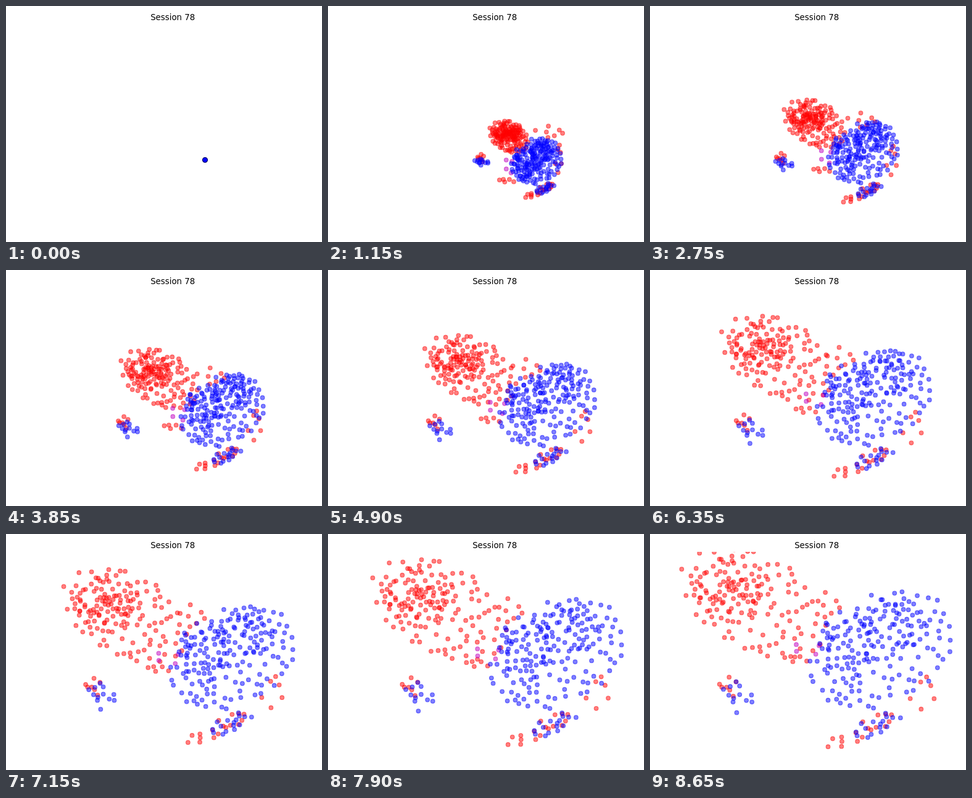
Write an HTML page with a canvas that moves like this. It is 512 px wide and 384 px high and loops after 8700 ms.

```html
<!DOCTYPE html>
<html lang="en">
<head>
<meta charset="utf-8">
<title>Session 78</title>
<style>
  html, body { margin: 0; width: 512px; height: 384px; overflow: hidden; background: #fff; }
  canvas, svg { position: absolute; left: 0; top: 0; width: 512px; height: 384px; display: block; }
  text { font: 13.333px "DejaVu Sans", sans-serif; text-anchor: middle; }
</style>
</head>
<body>
<canvas id="plot" width="512" height="384"></canvas>
<svg viewBox="0 0 512 384"><text x="270.2" y="22.5">Session 78</text></svg>
<script>
const LOOP = 8700, STEP = 50, HOLD = 150;
const SETTLE = 1150, END = 8650;
const ORIGIN = { x: 322.5, y: 250.5 };
const RED = '#f00', BLUE = '#00f', PLUM = '#bf00bf';
const ctx = document.getElementById('plot').getContext('2d');

let seed = 78;
const rand = () => (seed = (seed * 16807) % 2147483647) / 2147483647;
const mix = (a, b, k) => a + (b - a) * k;

// Random points in the unit disc that keep some distance; power .5 is even, 1 crowds the middle
function disc(count, power) {
  const pts = [];
  while (pts.length < count) {
    let best, bestGap = -1;
    for (let i = 0; i < 4; i++) {
      const a = rand() * Math.PI * 2, r = rand() ** power;
      const x = r * Math.cos(a), y = r * Math.sin(a);
      const gap = Math.min(9, ...pts.map(p => Math.hypot(p.x - x, p.y - y)));
      if (gap > bestGap) [best, bestGap] = [{ x, y }, gap];
    }
    pts.push(best);
  }
  return pts;
}

// An ellipse [cx, cy, rx, ry] of points that drifts and swells steadily; bend makes the drift start faster
function blob(color, count, from, to, { tilt = 0, power = .5, bend = 0 } = {}) {
  const pts = disc(count, power);
  const cos = Math.cos(tilt * Math.PI / 180), sin = Math.sin(tilt * Math.PI / 180);
  return {
    color,
    at(k) {
      const drift = k + bend * k * (1 - k);
      const cx = mix(from[0], to[0], drift), cy = mix(from[1], to[1], drift);
      const rx = mix(from[2], to[2], k), ry = mix(from[3], to[3], k);
      return pts.map(p => ({
        x: cx + p.x * rx * cos - p.y * ry * sin,
        y: cy + p.x * rx * sin + p.y * ry * cos
      }));
    }
  };
}

const blobs = [
  // red cloud: body, dense core, stragglers
  blob(RED, 92, [293, 212, 34, 24], [168, 110, 130, 78], { tilt: 28 }),
  blob(RED, 65, [291, 208, 20, 14], [132, 92, 62, 54], { power: .8 }),
  blob(RED, 7, [355, 207, 26, 12], [282, 120, 26, 26]),
  blob(RED, 5, [290, 284, 13, 4], [237, 203, 20, 8]),
  blob(RED, 6, [374, 248, 6, 24], [444, 258, 24, 28], { bend: .3 }),
  // small island and lower tail
  blob(RED, 7, [248, 248, 6, 7], [128, 250, 17, 18], { bend: .5 }),
  blob(RED, 17, [341, 301, 26, 6], [338, 321, 62, 16], { tilt: -25 }),
  blob(PLUM, 4, [293, 260, 9, 24], [254, 187, 36, 18]),
  // blue cloud: body and two dense cores
  blob(BLUE, 108, [338, 252, 43, 36], [375, 188, 125, 88], { tilt: -28 }),
  blob(BLUE, 38, [347, 235, 20, 18], [398, 145, 58, 45], { power: .8, bend: .4 }),
  blob(BLUE, 46, [321, 257, 22, 22], [318, 185, 46, 62], { power: .8, bend: .3 }),
  blob(BLUE, 12, [248, 254, 12, 5], [141, 265, 26, 26], { bend: .5 }),
  blob(BLUE, 16, [350, 297, 20, 6], [364, 312, 52, 14], { tilt: -25 })
];

function dot(x, y, r, fill, edge) {
  ctx.beginPath();
  ctx.arc(x, y, r, 0, Math.PI * 2);
  ctx.fillStyle = fill;
  ctx.strokeStyle = edge;
  ctx.fill();
  ctx.stroke();
}

function draw(now) {
  const t = Math.floor((now % LOOP) / STEP) * STEP;
  ctx.clearRect(0, 0, 512, 384);
  ctx.lineWidth = 1.11;
  if (t < HOLD) {
    dot(ORIGIN.x, ORIGIN.y, 4, BLUE, '#000050');
    return;
  }
  const left = Math.max(0, 1 - (t - 100) / (SETTLE - 100));
  const burst = 1 - left * left;
  const k = Math.max(0, (t - SETTLE) / (END - SETTLE));
  ctx.save();
  ctx.beginPath();
  ctx.rect(43, 29, 455, 326);
  ctx.clip();
  ctx.globalAlpha = .5;
  for (const { color, at } of blobs)
    for (const p of at(k))
      dot(mix(ORIGIN.x, p.x, burst), mix(ORIGIN.y, p.y, burst), 3.33, color, color);
  ctx.restore();
}

const start = performance.now();
function tick() {
  draw(performance.now() - start);
  requestAnimationFrame(tick);
}
tick();
</script>
</body>
</html>
```
